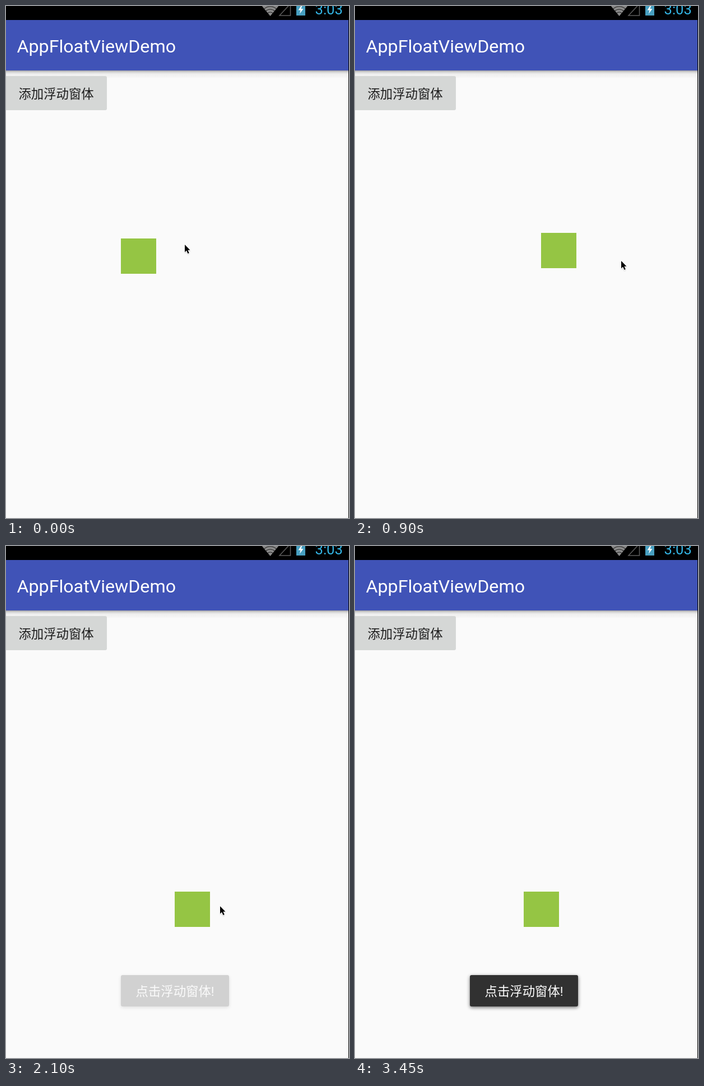
An HTML page that plays this animation: 612x914 px, repeating every 3.98 s.

```html
<!DOCTYPE html>
<html lang="zh">
<head>
<meta charset="utf-8">
<title>AppFloatViewDemo</title>
<style>
  html, body { margin: 0; width: 100%; height: 100%; overflow: hidden; background: #fafafa; }
  svg { display: block; width: 612px; height: 914px; }
  text { font-family: Roboto, "Noto Sans CJK SC", "Noto Sans CJK", sans-serif; }
</style>
</head>
<body>
<svg viewBox="0 0 612 914">
  <defs>
    <linearGradient id="barShade" x2="0" y2="1">
      <stop offset="0" stop-color="#9b9ba3"/>
      <stop offset=".2" stop-color="#d2d2d2"/>
      <stop offset=".5" stop-color="#efefef"/>
      <stop offset="1" stop-color="#f6f6f6"/>
    </linearGradient>
    <filter id="soft" x="-20%" y="-40%" width="140%" height="180%"><feGaussianBlur stdDeviation="3"/></filter>
    <filter id="faint" x="-50%" y="-50%" width="200%" height="200%"><feGaussianBlur stdDeviation="1"/></filter>
    <clipPath id="fan"><path d="M471.5 18 L455 -2 H488 Z"/></clipPath>
    <path id="arrow" d="M0 0V13.4L3 10.6L5.5 16L7.8 15L5.4 9.8H9.5Z"/>
  </defs>

  <rect width="612" height="914" fill="#fafafa"/>

  <!-- status bar -->
  <rect width="612" height="25" fill="#000"/>
  <g clip-path="url(#fan)">
    <rect x="455" width="33" height="18" fill="#8a8a8a"/>
    <g fill="none" stroke="#222" stroke-width="1.2">
      <circle cx="471.5" cy="18" r="7"/>
      <circle cx="471.5" cy="18" r="12"/>
      <circle cx="471.5" cy="18" r="17"/>
    </g>
  </g>
  <path d="M488 17H507.500V-4Z" fill="none" stroke="#5c5c5c" stroke-width="1.5"/>
  <rect x="518" y="-4" width="16" height="21" fill="#479fc1"/>
  <path d="M527 -1L521.500 7.500H525.500L524 14L530.500 5H526.500L528.500 -1Z" fill="#fff"/>
  <text x="551.500" y="14.500" font-size="25.600" fill="#33b5e5">3:03</text>

  <!-- app bar -->
  <rect y="115" width="612" height="13" fill="url(#barShade)"/>
  <rect y="25" width="612" height="90" fill="#4053b7"/>
  <text x="19.500" y="83" font-size="32.200" fill="#fff">AppFloatViewDemo</text>

  <!-- button -->
  <rect x="-3" y="125" width="183" height="61" rx="3" fill="#d5d7d6"/>
  <text x="22.400" y="165" font-size="22.400" font-weight="300" fill="#1c1c1c">添加浮动窗体</text>

  <rect x="611" width="1" height="914" fill="#000"/>

  <rect id="float" y="1" width="63" height="63" fill="#95c544"/>

  <g id="toast">
    <rect x="205" y="768" width="193" height="56" rx="3" fill="#000" opacity=".55" filter="url(#soft)"/>
    <rect x="205" y="766" width="193" height="56" rx="3" fill="#313131"/>
    <text x="231.500" y="803" font-size="22.400" fill="#fff">点击浮动窗体!</text>
  </g>

  <g id="cursor">
    <use href="#arrow" y="1.500" opacity=".4" filter="url(#faint)"/>
    <use href="#arrow" fill="#000" stroke="#fff" stroke-width="2" paint-order="stroke" stroke-linejoin="round"/>
  </g>
</svg>
<script>
  const LOOP = 3980, STEP = 150, LAST = 23;
  const GRAB = 5, RELEASE = 10, LAG = 0.5;
  const GRIP = [33, 35];
  const FROM = [205, 414], HOME = [222, 378];

  // Turning points of the pointer: step, x, y.
  const turns = [
    [0, 319, 426], [1, 401, 430], [2, 314, 436], [3, 320, 443],
    [5, 254, 423], [6, 475, 455], [6.5, 511, 362], [7.5, 297, 324],
    [8, 177, 469], [8.5, 217, 575], [9.5, 332, 651], [10, 334, 651],
    [12, 338, 643], [13, 338, 643], [14, 382, 643], [15, 404, 643],
    [16, 404, 643], [17, 470, 783], [19, 568, 825],
    [20, 669, 687], [22, 555, 857], [23, 640, 914]
  ];

  const [floatBox, toast, cursor] =
    ["float", "toast", "cursor"].map(id => document.getElementById(id));

  const clamp = v => Math.max(0, Math.min(1, v));
  const mix = (a, b, k) => a.map((v, i) => v + (b[i] - v) * k);

  function pointer(step) {
    const next = Math.max(1, turns.findIndex(turn => turn[0] >= step));
    const [t0, ...a] = turns[next - 1];
    const [t1, ...b] = turns[next];
    return mix(a, b, (step - t0) / (t1 - t0));
  }

  // The box settles at home, then trails the pointer until it is let go.
  function floatAt(step) {
    if (step <= GRAB) return mix(FROM, HOME, 1 - (1 - clamp(step / 3)) ** 2);
    const held = pointer(Math.min(step - LAG, RELEASE));
    return held.map((v, i) => v - GRIP[i]);
  }

  function toastAlpha(step) {
    return (1 - Math.cos(Math.PI * clamp((step - 12.9) * 0.265))) / 2 * (step > 13);
  }

  function place(node, pos) {
    const [x, y] = pos.map(Math.round);
    node.setAttribute("transform", `translate(${x} ${y})`);
  }

  function draw(time) {
    const step = Math.min(LAST, Math.floor((time % LOOP) / STEP));
    place(floatBox, floatAt(step));
    place(cursor, pointer(step));
    toast.setAttribute("opacity", toastAlpha(step));
  }

  const start = performance.now();
  function tick() {
    draw(performance.now() - start);
    requestAnimationFrame(tick);
  }
  tick();
</script>
</body>
</html>
```
